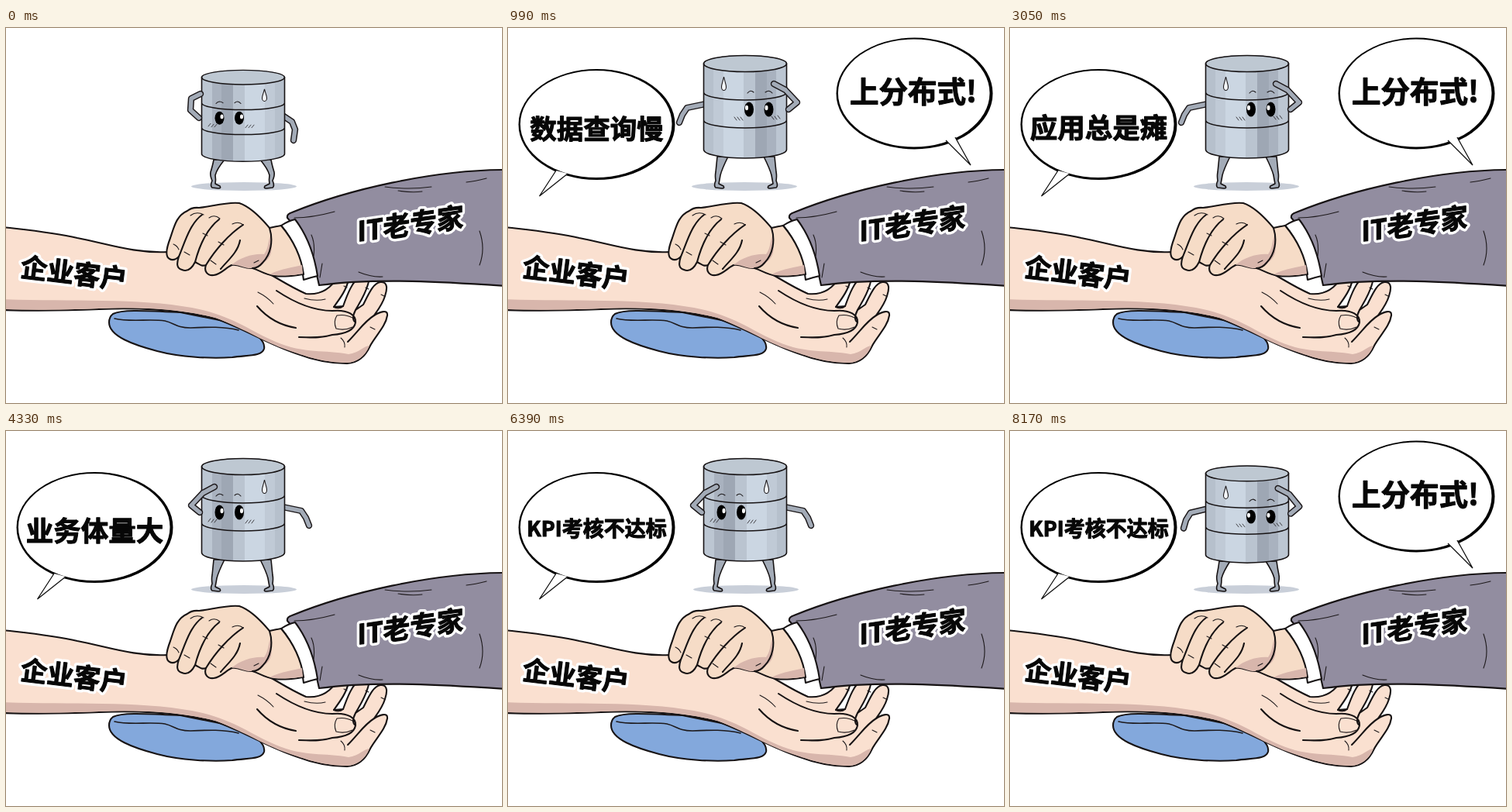
Write an HTML page that moves like this. It is 640x484 px and loops after 8240 ms.

```html
<!DOCTYPE html>
<html lang="zh">
<head>
<meta charset="utf-8">
<title>会诊</title>
<style>
html, body { margin: 0; width: 100%; height: 100%; overflow: hidden; background: #fff; }
svg { display: block; width: 100%; height: 100%; }
text { font-family: "Noto Sans CJK SC", "Noto Sans CJK", "Noto Sans", sans-serif; font-weight: 900; text-anchor: middle; }
.ink { stroke: #171314; stroke-width: 2.1; stroke-linecap: round; stroke-linejoin: round; }
.robot { stroke-width: 1.6; }
.thin { stroke: #1d191b; stroke-width: 1.1; stroke-linecap: round; fill: none; }
.line { fill: none; }
.skin { fill: #fae0d0; }
.tan { fill: #f6dcc7; }
.shade { fill: #d8b6ac; }
.heavy { fill: #070707; stroke: #070707; stroke-width: 1.1; stroke-linejoin: round; }
.halo { fill: #fff; stroke: #fff; stroke-width: 8; stroke-linejoin: round; }
</style>
</head>
<body>
<svg viewBox="0 0 640 484">
<defs>
  <clipPath id="bodyClip"><path d="M252.500 46V157A53.500 11 0 0 0 359.500 157V46A53.500 11 0 0 0 252.500 46Z"/></clipPath>
  <text id="client" font-size="34.500" transform="translate(87.500 317) rotate(7)" y="12">企业客户</text>
  <text id="expert" font-size="35" transform="translate(522 254) rotate(-8) skewX(-8)" y="12">IT老专家</text>
</defs>
<rect width="640" height="484" fill="#fff"/>

<g id="robot">
  <ellipse cx="307" cy="204.500" rx="68" ry="5.500" fill="#c9cfd9"/>
  <path id="legs" class="ink robot" fill="#a3abb7"/>
  <g id="sideArm"></g>
  <g id="body">
    <g clip-path="url(#bodyClip)" id="bands"></g>
    <ellipse class="ink robot" cx="306" cy="46" rx="53.500" ry="10.500" fill="#bec8d2"/>
    <path class="ink robot line" d="M252.500 46V157A53.500 11 0 0 0 359.500 157V46M252.500 83A53.500 10 0 0 0 359.500 83M252.500 119A53.500 10 0 0 0 359.500 119"/>
    <ellipse cx="275.500" cy="105" rx="6" ry="9.500"/>
    <ellipse cx="301" cy="105" rx="6" ry="9.500"/>
    <g fill="#fff"><ellipse cx="278.500" cy="103" rx="2" ry="3.200"/><ellipse cx="304" cy="103" rx="2" ry="3.200"/></g>
    <path class="thin" d="M271 84Q275 79 280 83M295 83Q299 79 303 84"/>
    <path class="thin" style="stroke-width:.8" d="M261 117l3-4M265 118l3-4M269 118l3-4M309 119l3-4M313 119l3-4M317 119l3-4"/>
    <path class="thin" style="fill:#f4f8fc" d="M333.500 63C332 70 330.500 73 330.500 76A3 4.500 0 0 0 336.500 76C336.500 73 335 70 333.500 63Z"/>
  </g>
  <g id="browArm"></g>
</g>

<g id="leftBubble">
  <ellipse cx="114.500" cy="124.500" rx="101" ry="71.500"/>
  <ellipse cx="113.700" cy="124" rx="97.800" ry="69" fill="#fff"/>
  <path d="M62 184L40.500 217L77 188" fill="#fff" stroke="#111" stroke-width="1.300"/>
  <text id="complaint" class="heavy" x="114.500"></text>
</g>
<g id="rightBubble">
  <ellipse cx="524.500" cy="84.500" rx="101" ry="72"/>
  <ellipse cx="523.700" cy="84" rx="97.800" ry="69.500" fill="#fff"/>
  <path d="M565 145L597 177L577 141" fill="#fff" stroke="#111" stroke-width="1.300"/>
  <text class="heavy" x="523" y="96" font-size="37.500">上分布式!</text>
</g>

<!-- cushion -->
<path class="ink" fill="#83a8dc" d="M138 369C150 363 180 365 225 367L300 382C322 392 335 404 333 414C330 424 312 422 292 425C265 427 225 425 195 417C165 409 133 398 133 380Q133 373 138 369Z"/>
<path class="thin" style="stroke-width:1.6" d="M140 375C160 380 185 375 205 378C218 381 220 387 238 387C260 386 282 385 300 390"/>

<!-- lower arm and open hand -->
<path class="ink skin" d="M-4 257C30 261 62 264 92 271C130 278 165 291 208 289L322 308C345 319 362 332 387 343C407 345 420 335 428 321C432 314 444 315 442 324C440 337 431 349 423 360L435 359C440 345 447 326 457 321C466 318 470 323 467 331C463 345 456 355 451 364L461 357C468 343 474 329 483 328C493 327 492 337 489 346C486 356 480 364 475 371C483 366 493 363 492 371C490 385 477 397 470 410C463 425 454 432 440 433C415 433 395 428 374 420C335 407 310 389 270 375C220 362 160 361 120 363C70 365 30 365 -4 364Z"/>
<path class="shade" d="M-4 350C80 353 170 348 240 361C290 370 315 391 348 405C385 421 412 415 442 421C456 419 462 410 469 410C463 425 452 431 440 432C410 432 385 423 370 418C335 407 310 389 270 374C220 361 160 360 120 362C70 364 30 364 -4 363Z"/>
<path class="ink line" d="M324 359C337 374 355 384 374 387M349 339C373 355 397 365 421 365C442 363 452 371 451 380C449 391 436 395 421 396C404 401 392 399 378 399M423 360Q430 363 435 359M451 364Q445 376 451 380M475 371C462 379 455 391 441 405"/>
<path class="thin" d="M427 371Q422 379 426 388Q437 391 447 386M427 371Q438 369 447 374M325 341Q337 347 345 356M385 349Q400 353 412 350M432 400Q438 405 437 412M464 335l4 2M436 333l4 2M484 344l4 2M470 386l6 3"/>

<!-- sleeve, cuff and resting hand -->
<path class="ink" fill="#928da0" d="M363 245Q362 240 369 238C440 209 550 183 646 183V333C570 328 480 322 404 332C400 310 384 268 363 245Z"/>
<path class="thin" d="M489 205Q520 209 549 205M372 245Q395 245 424 237M506 210Q524 213 537 211M455 315Q472 322 486 321M611 262Q619 285 611 306M405 322l3-18M620 194Q605 198 594 199M397 294Q399 278 394 267"/>
<path class="ink" fill="#fff" d="M355 255Q364 249 373 247C389 268 398 294 402 320Q393 322 384 325C381 298 371 274 355 255Z"/>
<path class="ink tan" d="M355 255Q349 256 340 258C330 246 316 231 301 226C285 224 263 231 249 232Q240 231 234 236C220 242 217 256 212 271C207 284 205 295 211 298C216 301 220 298 223 295C220 304 220 310 227 312C234 315 240 310 244 302C250 305 252 308 258 306C255 314 260 320 268 319C277 318 283 310 291 306C300 304 307 311 318 310C328 313 333 318 346 320C361 322 374 319 384 318C381 295 370 273 355 255Z"/>
<path class="shade" d="M291 306C302 296 319 291 333 292C339 284 338 276 341 268C344 283 344 294 335 301Q328 309 318 310C307 311 300 304 291 306ZM340 318C356 310 371 309 382 306L383 317Q365 321 340 318Z"/>
<path class="ink line" d="M253 241C237 253 231 276 223 295M275 247C257 261 249 283 244 302M306 254C288 266 270 286 258 306M302 274C299 290 286 300 277 311M340 258C345 274 342 292 331 303C327 308 322 310 318 310"/>
<path class="thin" d="M216 279Q221 281 223 286M230 289l7 4M264 300l7 5M238 242Q246 236 255 241M262 245Q269 240 276 246M292 253Q300 249 306 254M254 265l6 3M274 276l7 4M320 303l6-3"/>

<use href="#client" class="halo"/><use href="#client" class="heavy"/>
<use href="#expert" class="halo"/><use href="#expert" class="heavy"/>
</svg>

<script>
const LOOP = 8240, ROUND = 2060, ANSWER = 780, STEP = 70;
const complaints = [
  ['数据查询慢', 34.5, 143],
  ['应用总是瘫', 35.5, 142],
  ['业务体量大', 35.5, 142],
  ['KPI考核不达标', 27, 136]
];
const squashSteps = [.5, 1, .67, .33, 0];
const armSteps = [.15, 1, .67, .33, 0];
const popSteps = [0, 0, .36, .72, 1];
const bands = [[252, '#bcc6d2'], [266, '#a9b2bf'], [278, '#9ea7b4'], [293, '#bac4d0'],
  [308, '#cbd6e2'], [334, '#c0cad6'], [347, '#b6c0cc']];
const arms = {
  browArm: { up: [[250, 105], [239, 96], [254, 80], [269, 72]], down: [[249, 116], [238, 106], [239, 91], [251, 85]] },
  sideArm: { up: [[357, 98], [381, 103], [387, 112], [391, 122]], down: [[357, 113], [369, 121], [373, 131], [371, 145]] }
};

const $ = id => document.getElementById(id);
const mix = (a, b, k) => a + (b - a) * k;

$('bands').innerHTML = bands.map(([x, color]) =>
  `<rect x="${x}" y="30" width="${361 - x}" height="142" fill="${color}"/>`).join('');
for (const id in arms) {
  $(id).innerHTML = [['#1d191b', 8.4], ['#a3abb7', 5.4]].map(([color, width]) =>
    `<path fill="none" stroke="${color}" stroke-width="${width}" stroke-linecap="round" stroke-linejoin="round"/>`).join('');
}

function drawArm(id, k) {
  const { up, down } = arms[id];
  const points = up.map(([x, y], i) => [mix(x, down[i][0], k), mix(y, down[i][1], k)]);
  for (const path of $(id).children) path.setAttribute('d', 'M' + points.join('L'));
}

function drawLegs(k) {
  const hip = 166 + 4 * k, out = 2 * k;
  const leg = (x, side) => {
    const at = (dx, y) => `${x + side * dx} ${y}`;
    return `M${at(-6, hip)}Q${at(2 + out, 182)} ${at(4 + out, 190)}Q${at(5, 196)} ${at(6, 201)}L${at(0, 204)}` +
      `Q${at(-2, 207)} ${at(2, 207)}L${at(10, 206)}Q${at(13, 204)} ${at(10, 197)}` +
      `Q${at(11 + out, 190)} ${at(10 + out, 186)}Q${at(9, 176)} ${at(8, hip)}Z`;
  };
  $('legs').setAttribute('d', leg(276, -1) + leg(334, 1));
}

function scaleFrom(id, x, y, s) {
  $(id).style.display = s ? '' : 'none';
  $(id).setAttribute('transform', `translate(${x} ${y}) scale(${s}) translate(${-x} ${-y})`);
}

function render(ms) {
  const time = (ms + STEP) % LOOP;
  const round = Math.floor(time / ROUND), local = time % ROUND;
  const answering = local >= ANSWER;
  const step = Math.min(4, Math.floor((answering ? local - ANSWER : local) / STEP));
  const leaving = !answering && step === 0;
  const facingRight = answering ? step > 0 : leaving;

  const squash = squashSteps[step];
  $('robot').setAttribute('transform', facingRight ? 'translate(612 0) scale(-1 1)' : '');
  $('body').setAttribute('transform',
    `translate(0 ${157 + 5.5 * squash}) scale(1 ${1 - .11 * squash}) translate(0 -157)`);
  drawLegs(squash);
  for (const id in arms) drawArm(id, armSteps[step]);

  const [words, size, baseline] = complaints[leaving ? (round + 3) % 4 : round];
  const label = $('complaint');
  label.textContent = words;
  label.setAttribute('font-size', size);
  label.setAttribute('y', baseline);
  scaleFrom('leftBubble', 41, 217, answering || leaving ? 1 : popSteps[step]);
  scaleFrom('rightBubble', 597, 177, leaving ? 1 : answering ? popSteps[step] : 0);
}

const start = performance.now();
function tick() {
  render(performance.now() - start);
  requestAnimationFrame(tick);
}
tick();
</script>
</body>
</html>
```
